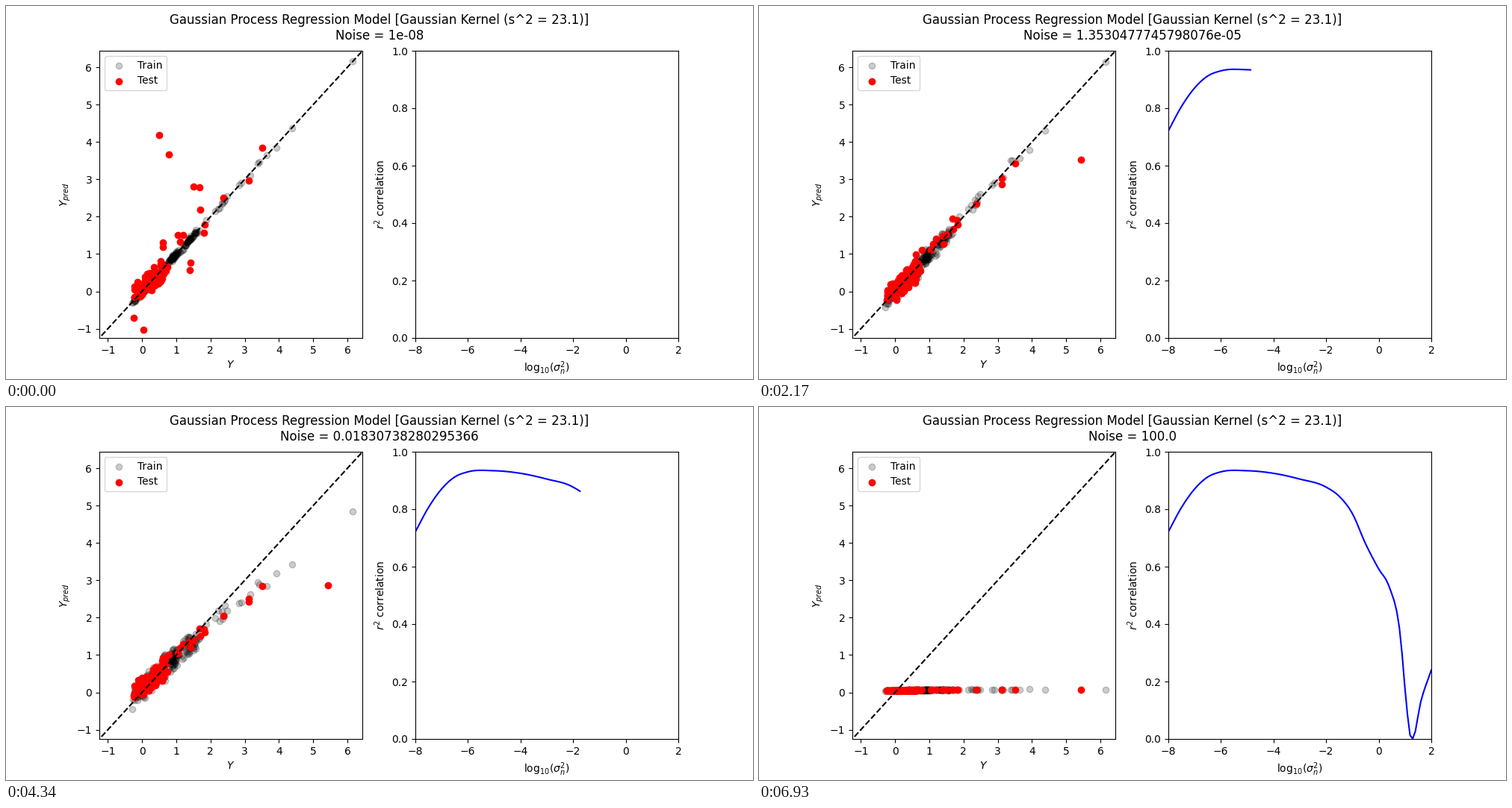
A matplotlib script for the animation above (7000 ms loop, 1000 by 500 pixels).

```python
import numpy as np
import matplotlib.pyplot as plt
from matplotlib.animation import FuncAnimation

FRAMES = 100
LOG_NOISE = np.linspace(-8, 2, FRAMES)
NOISE = np.logspace(-8, 2, FRAMES)
LIMITS = (-1.247, 6.44)

TRAIN_TAIL = [1.87, 2.14, 2.22, 2.26, 2.33, 2.35, 2.4, 2.42, 2.48, 2.83, 2.9,
              3.17, 3.38, 3.43, 3.64, 3.93, 4.39, 6.15]

# x, overfitting error at low noise, remaining error afterwards
TEST_OUTLIERS = np.array([
    (-0.24, -0.55, 0.02), (0.04, -1.2, -0.25), (0.5, 4.3, 0.1),
    (0.61, 0.75, 0.38), (0.61, 0.73, -0.3), (0.78, 3.33, 0.3),
    (1.05, 0.53, 0.05), (1.12, 0.22, 0.15), (1.2, 0.33, 0.2),
    (1.4, -1, 0.1), (1.42, -0.74, -0.15), (1.5, 1.53, 0), (1.68, 1.26, 0.25),
    (1.7, 0.58, -0.03), (1.81, -0.3, 0.1), (1.83, -0.04, -0.05),
    (2.38, 0.16, -0.03), (3.12, -0.13, -0.25), (3.12, 4.1, -0.15),
    (3.51, 0.4, -0.1), (5.44, 4.2, -2),
])

R2_POINTS = np.array([
    (-8, .72), (-7.5, .805), (-7, .87), (-6.5, .912), (-6, .93), (-5, .934),
    (-4, .925), (-3, .905), (-2, .877), (-1.5, .845), (-1, .785), (-.5, .68),
    (0, .592), (.4, .53), (.8, .378), (1.09, .088), (1.19, .014),
    (1.29, .001), (1.6, .13), (2, .24),
])


def smooth_curve(x, points):
    """Cubic Hermite curve through the points."""
    px, py = points.T
    slope = np.gradient(py, px)
    k = np.clip(np.searchsorted(px, x) - 1, 0, len(px) - 2)
    h = px[k + 1] - px[k]
    t = (x - px[k]) / h
    return ((1 + 2 * t) * (1 - t) ** 2 * py[k] + t * (1 - t) ** 2 * h * slope[k]
            + t * t * (3 - 2 * t) * py[k + 1] - t * t * (1 - t) * h * slope[k + 1])


def decay(noise, half, power=1):
    return 1 / (1 + (noise / half) ** power)


class Points:
    """Points whose predictions shrink from y = x to zero as noise grows."""

    def __init__(self, x, early=0, late=0, spread=0, spread_growth=0):
        self.x = np.asarray(x)
        self.early, self.late = early, late
        self.spread, self.spread_growth = spread, spread_growth
        self.scatter = np.clip(rng.normal(size=(2, len(self.x))), -2, 2)

    def at(self, noise):
        decades = np.log10(noise) + 8
        overfit = decay(noise, 8e-8, 0.85)
        fit = decay(noise, 0.06, 0.9)
        slow = decay(noise, 3)
        flat = 0.43 * decay(noise, 13) + 0.76 * slow * np.tanh(self.x / 1.4)
        error = self.early * overfit + self.late * (1 - overfit) * fit
        turn = 0.2 * decades
        wobble = np.cos(turn) * self.scatter[0] + np.sin(turn) * self.scatter[1]
        wobble *= self.spread + self.spread_growth * decades
        wobble *= fit + (1 - fit) * 0.6 * slow
        y = self.x * fit + flat * (1 - fit) + error + wobble
        return np.column_stack([self.x, y])


rng = np.random.default_rng(4)
train_x = np.concatenate([
    rng.uniform(-0.3, 0.7, 135),
    rng.normal(0.9, 0.1, 55),
    np.clip(rng.normal(1.36, 0.12, 42), 1.1, 1.65),
    rng.uniform(1.5, 1.8, 4),
    TRAIN_TAIL,
])
test_x = rng.triangular(-0.26, 0.2, 0.8, 100)
bulk_error = 0.08 - 0.15 * test_x

train = Points(train_x, spread=0.04, spread_growth=0.02)
test_bulk = Points(test_x, bulk_error, bulk_error, spread=0.14)
test_outliers = Points(*TEST_OUTLIERS.T)
r2 = smooth_curve(LOG_NOISE, R2_POINTS)

fig, (fit_ax, r2_ax) = plt.subplots(1, 2, figsize=(10, 5), dpi=100)
title = fig.suptitle("")

train_dots = fit_ax.scatter([], [], c="k", alpha=0.2, label="Train")
test_dots = fit_ax.scatter([], [], c="r", label="Test")
fit_ax.plot([-2, 7], [-2, 7], "k--")
fit_ax.set(xlim=LIMITS, ylim=LIMITS, xlabel="$Y$", ylabel="$Y_{pred}$")
fit_ax.legend(loc="upper left")

r2_line, = r2_ax.plot([], [], "b-")
r2_ax.set(xlim=(-8, 2), ylim=(0, 1), xlabel=r"log$_{10}(\sigma_n^2)$",
          ylabel="$r^2$ correlation")


def update(i):
    noise = NOISE[i]
    title.set_text("Gaussian Process Regression Model "
                   f"[Gaussian Kernel (s^2 = 23.1)]\nNoise = {noise}")
    train_dots.set_offsets(train.at(noise))
    test_dots.set_offsets(np.vstack([test_bulk.at(noise), test_outliers.at(noise)]))
    r2_line.set_data(LOG_NOISE[:i + 1], r2[:i + 1])
    return title, train_dots, test_dots, r2_line


anim = FuncAnimation(fig, update, frames=FRAMES, interval=70, repeat=True, repeat_delay=0)
plt.show()
```
